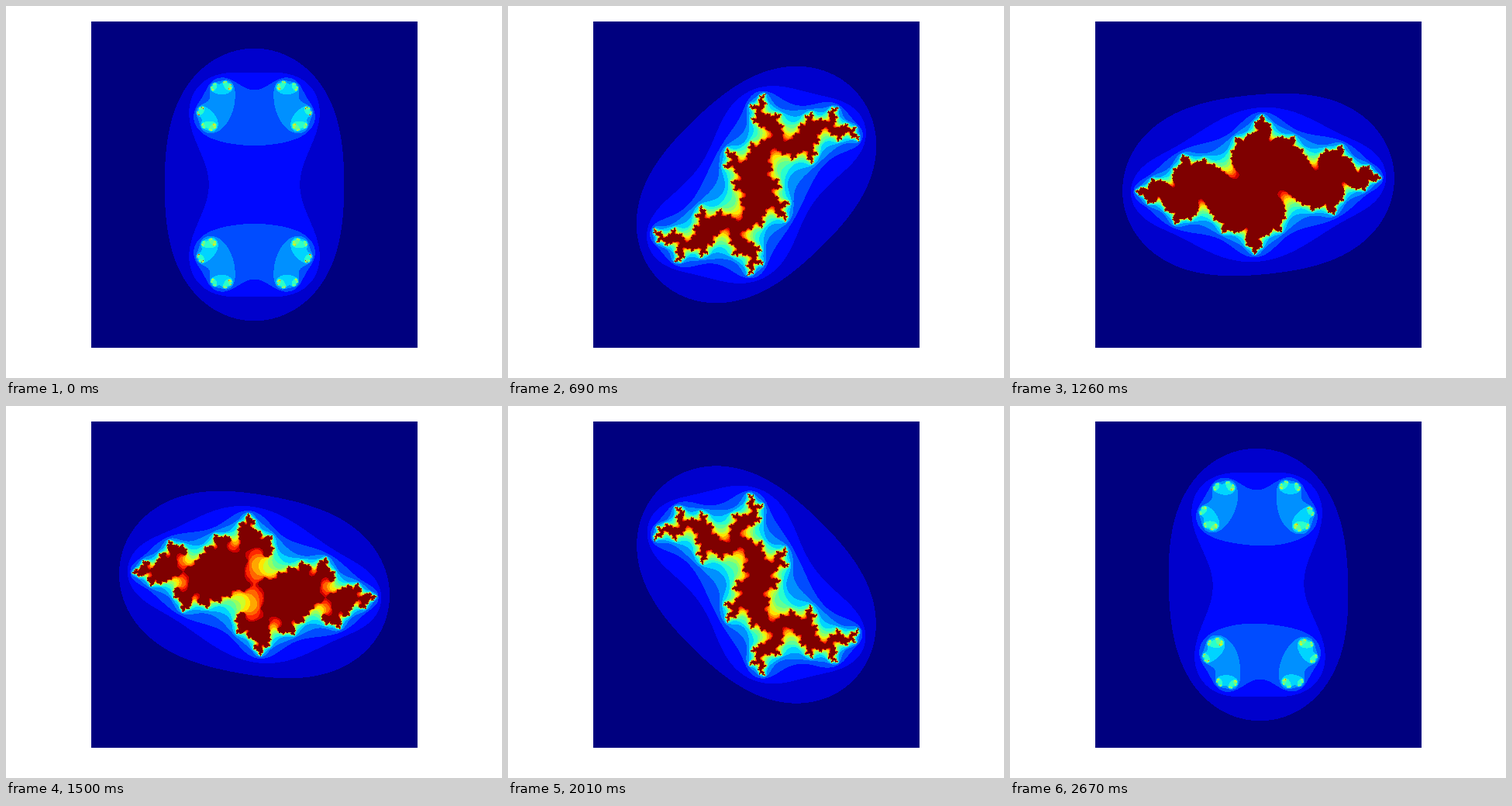
Write an HTML page with a canvas that moves like this. It is 640 px wide and 480 px high and loops after 2.7 s.

```html
<!DOCTYPE html>
<html>
<head>
<meta charset="utf-8">
<style>
html, body { margin: 0; width: 100%; height: 100%; overflow: hidden; background: #fff; }
canvas { display: block; }
</style>
</head>
<body>
<canvas width="640" height="480"></canvas>
<script>
const FRAMES = 90, FRAME_MS = 30, ANGLE_STEP = 0.07, RADIUS = 0.7885;
const SIZE = 421, LEFT = 110, TOP = 20, SCALE = SIZE / 4, LIMIT = 15;

const ctx = document.querySelector('canvas').getContext('2d');
const image = ctx.createImageData(SIZE, SIZE);
const pixels = new Uint32Array(image.data.buffer);

// Piecewise linear curve through [position, value] stops
function ramp(stops, t) {
  if (t <= stops[0][0]) return stops[0][1];
  for (let i = 1; i < stops.length; i++) {
    const [x0, y0] = stops[i - 1], [x1, y1] = stops[i];
    if (t <= x1) return y0 + (y1 - y0) * (t - x0) / (x1 - x0);
  }
  return stops[stops.length - 1][1];
}

const RED = [[0.35, 0], [0.66, 1], [0.89, 1], [1, 0.5]];
const GREEN = [[0.125, 0], [0.375, 1], [0.64, 1], [0.91, 0]];
const BLUE = [[0, 0.5], [0.11, 1], [0.34, 1], [0.65, 0]];

const palette = Array.from({ length: LIMIT + 1 }, (_, level) => {
  const channel = stops => Math.floor(255 * ramp(stops, level / LIMIT) + 1e-6);
  return (255 << 24 | channel(BLUE) << 16 | channel(GREEN) << 8 | channel(RED)) >>> 0;
});

// Number of steps of z = z² + c that stay within |z| <= 2
function escapeLevel(x, y, cx, cy) {
  for (let level = 0; level < LIMIT; level++) {
    const nextX = x * x - y * y + cx;
    y = 2 * x * y + cy;
    x = nextX;
    if (x * x + y * y > 4) return level;
  }
  return LIMIT;
}

function drawJulia(angle) {
  const cx = RADIUS * Math.cos(angle), cy = RADIUS * Math.sin(angle);
  const half = (SIZE - 1) / 2, last = pixels.length - 1;
  // The set is symmetric under a half turn, so fill both ends at once
  for (let i = 0; i <= last / 2; i++) {
    const x = (i % SIZE - half) / SCALE;
    const y = (Math.floor(i / SIZE) - half) / SCALE;
    pixels[i] = pixels[last - i] = palette[escapeLevel(x, y, cx, cy)];
  }
  ctx.putImageData(image, LEFT, TOP);
}

let shown = -1;
function tick(now) {
  const frame = Math.floor(now / FRAME_MS) % FRAMES;
  if (frame !== shown) drawJulia(ANGLE_STEP * frame);
  shown = frame;
  requestAnimationFrame(tick);
}
drawJulia(0);
requestAnimationFrame(tick);
</script>
</body>
</html>
```
